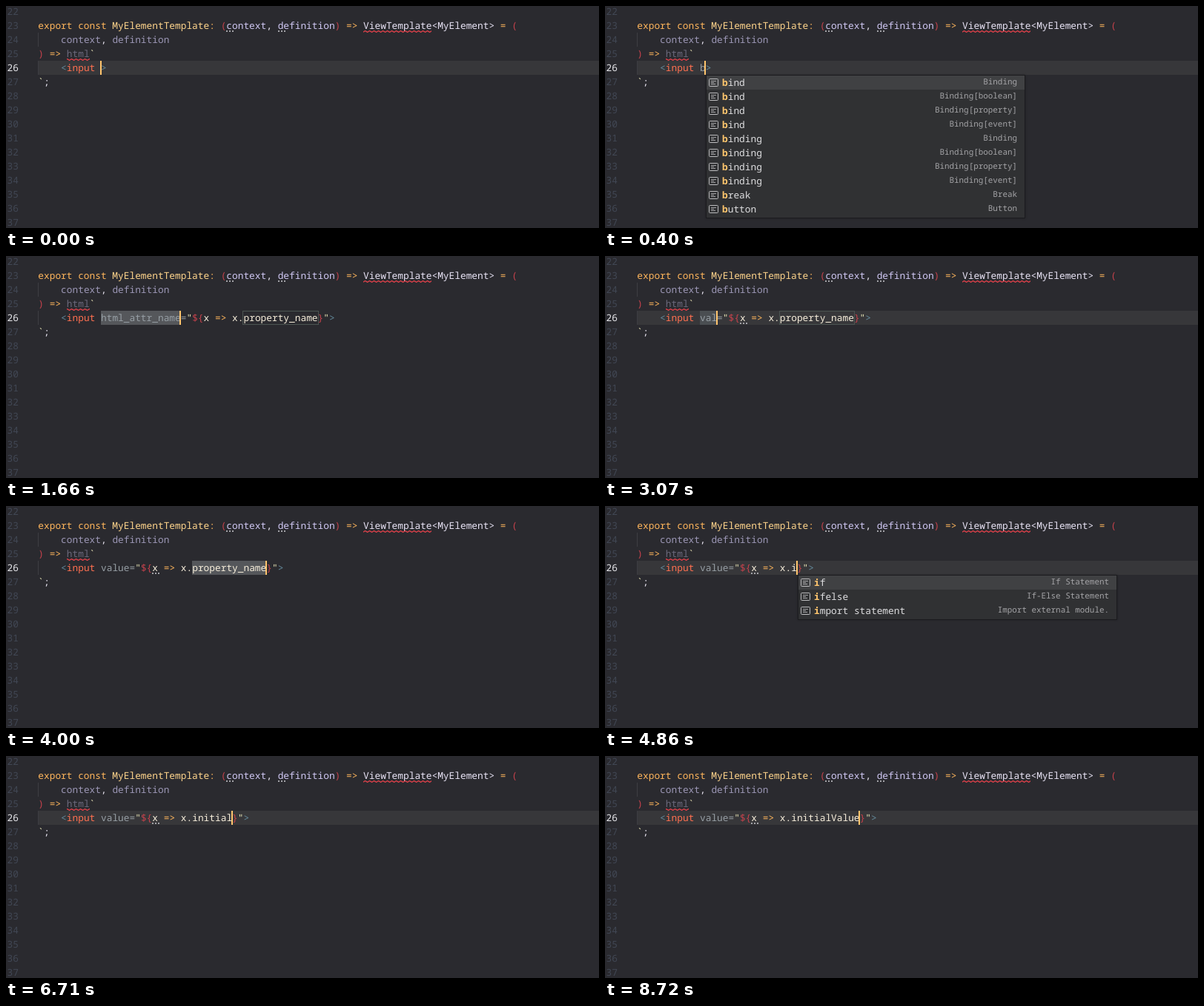
An HTML page for the animation above (8920 ms loop, 800 by 300 pixels).

```html
<!DOCTYPE html>
<html lang="en">
<head>
<meta charset="utf-8">
<title>Template snippet</title>
<style>
html, body { margin: 0; width: 100%; height: 100%; overflow: hidden; background: #2a2a2f; }
#stage {
  position: relative; width: 800px; height: 300px; overflow: hidden;
  font: 500 12.83px/19px "Noto Sans Mono", "DejaVu Sans Mono", monospace;
  font-variant-ligatures: none; text-rendering: geometricPrecision; color: #e8e4f0;
}
pre { position: absolute; margin: 0; font: inherit; white-space: pre; }
#nums { left: 1.5px; top: -2px; color: #414754; }
#nums b { font-weight: inherit; color: #e6e6ea; }
#code { left: 43.3px; top: -2px; }
#line { left: 43.3px; top: 74px; }
#band { position: absolute; left: 43px; right: 0; top: 74px; height: 19px; background: #37373a; }
.guide { position: absolute; left: 43px; width: 1px; height: 19px; background: #3d3d42; }
#wave { position: absolute; left: 0; top: 0; }
#caret { position: absolute; top: 74px; width: 2px; height: 19px; background: #ffc56d; }

.kw { color: #ffb65c; }
.fn { color: #ffd58c; }
.br { color: #c6424c; }
.arg { color: #d0c8f4; }
.dim { color: #9c97b6; }
.off { color: #6b697c; }
.ty { color: #e9e4f6; }
.str { color: #e6e3b4; }
.tag { color: #648b9d; }
.el { color: #ff7051; }
.attr { color: #979fa5; }
.prop { color: #f8efdc; }
.hint { position: relative; }
.hint::after {
  content: ""; position: absolute; left: 0; bottom: 0; width: 10px; height: 2px;
  background: repeating-linear-gradient(90deg, #a3a3a8 0 2px, transparent 2px 4px);
}
.sel, .stop { display: inline-block; height: 19px; vertical-align: top; background: #55575b; }
.stop { background: #4a4e52; }
.last { display: inline-block; height: 17px; line-height: 17px; margin: 1px 0; vertical-align: top; box-shadow: 0 0 0 1px #4c5552; }

#menu {
  position: absolute; top: 93px; width: 431px; box-sizing: border-box;
  border: 1px solid #1b1b1e; padding-bottom: 2px; background: #303133;
  box-shadow: 0 0 3px #0004;
}
.row { position: relative; height: 19px; line-height: 18px; padding-left: 21px; white-space: pre; color: #dedee0; }
.row:first-child { background: #404143; }
.row b { color: #ffc56d; }
.row i { position: absolute; right: 10px; top: 0; font-style: normal; font-size: 10.9px; color: #a4a4a7; }
.row svg { position: absolute; left: 3px; top: 4px; fill: none; stroke: #bcbcbe; }
</style>
</head>
<body>
<div id="stage">
  <div id="band"></div>
  <div class="guide" style="top:36px"></div>
  <div class="guide" style="top:74px"></div>
  <pre id="nums"></pre>
  <pre id="code">

<span class="kw">export const </span><span class="fn">MyElementTemplate</span><span class="kw">:</span> <span class="br">(</span><span class="arg hint">context</span>, <span class="arg hint">definition</span><span class="br">)</span> <span class="kw">=&gt;</span> <span class="ty">ViewTemplate&lt;MyElement&gt;</span> <span class="kw">=</span> <span class="br">(</span>
    <span class="dim">context</span>, <span class="dim">definition</span>
<span class="br">)</span> <span class="kw">=&gt;</span> <span class="off">html</span><span class="str">`</span>

<span class="str">`</span>;</pre>
  <svg id="wave" width="800" height="100">
    <pattern id="zig" width="6" height="3" patternUnits="userSpaceOnUse">
      <path d="M-1 .5L1.5 2.5L4.5 .5L7.5 2.5" fill="none" stroke="#e8414a" stroke-width="1.2"/>
    </pattern>
    <rect x="482" y="33" width="92" height="3" fill="url(#zig)"/>
    <rect x="82" y="69" width="31" height="3" fill="url(#zig)" transform="translate(0 2)"/>
  </svg>
  <pre id="line"></pre>
  <div id="caret"></div>
  <div id="menu"></div>
</div>
<script>
const LOOP = 8920, LEFT = 42.5, CH = 7.698;
const $ = id => document.getElementById(id);
const esc = s => s.replace(/</g, "&lt;").replace(/>/g, "&gt;");
const tok = (s, cls) => `<span class="${cls}">${esc(s)}</span>`;

const kinds = ["Binding", "Binding[boolean]", "Binding[property]", "Binding[event]"];
const binds = ["bind", "binding"].flatMap(name => kinds.map(kind => [name, kind]));
const importRow = ["import statement", "Import external module."];
const menus = {
  b: [...binds, ["break", "Break"], ["button", "Button"]],
  bi: binds,
  bin: binds,
  i: [["if", "If Statement"], ["ifelse", "If-Else Statement"], importRow],
  in: [importRow]
};

// Each step changes only the listed parts of the state.
const steps = [
  [0, { attr: "", prop: null, inProp: false, on: true, attrBox: "", propBox: "", hint: false, menu: "" }],
  [70, { on: false }],
  [400, { attr: "b", menu: "b", on: true }],
  [530, { attr: "bi", menu: "bi" }],
  [600, { attr: "bin", menu: "bin" }],
  [1130, { on: false }],
  [1590, { attr: "html_attr_name", prop: "property_name", attrBox: "sel", propBox: "last", menu: "", on: true }],
  [2060, { hint: true }],
  [2130, { on: false }],
  [2660, { on: true }],
  [2860, { attr: "v", attrBox: "stop" }],
  [2930, { attr: "va" }],
  [3070, { attr: "val" }],
  [3270, { attr: "valu" }],
  [3340, { attr: "value" }],
  [3870, { on: false }],
  [4000, { inProp: true, attrBox: "", propBox: "sel", on: true }],
  [4460, { on: false }],
  [4860, { prop: "i", propBox: "", menu: "i", on: true }],
  [4930, { prop: "in", menu: "in" }],
  [5060, { prop: "ini", menu: "" }],
  [5190, { prop: "init" }],
  [5650, { on: false }],
  [6180, { on: true }],
  [6510, { prop: "initi" }],
  [6580, { prop: "initia" }],
  [6710, { prop: "initial" }],
  [7110, { prop: "initialV" }],
  [7330, { prop: "initialVa" }],
  [7400, { prop: "initialVal" }],
  [7600, { prop: "initialValu" }],
  [7730, { prop: "initialValue" }],
  [8190, { on: false }],
  [8720, { on: true }]
];
const states = [];
steps.forEach(([, change], i) => states.push({ ...states[i - 1], ...change }));

function lineHtml(s) {
  let html = "    " + tok("<", "tag") + tok("input", "el") + " " + tok(s.attr, "attr " + s.attrBox);
  if (s.prop !== null) {
    html += tok("=", "attr") + tok('"', "str") + tok("${", "br") +
      tok("x", s.hint ? "prop hint" : "prop") + " " + tok("=>", "kw") + " " + tok("x.", "prop") +
      tok(s.prop, "prop " + s.propBox) + tok("}", "br") + tok('"', "str");
  }
  return html + tok(">", "tag");
}

function mark(label, typed) {
  let n = 0;
  return [...label].map(c => c === typed[n] ? (n++, `<b>${c}</b>`) : c).join("");
}

function rowHtml([label, kind], typed) {
  const icon = '<svg width="13" height="12"><rect x=".5" y=".5" width="12" height="10" rx="1"/><path d="M3 3.5h7M3 5.5h4M3 7.5h6" opacity=".8"/></svg>';
  return `<div class="row">${icon}${mark(label, typed)}<i>${kind}</i></div>`;
}

function show(s) {
  const col = 11 + s.attr.length + (s.inProp ? 11 + s.prop.length : 0);
  const x = Math.floor(LEFT + col * CH);
  $("line").innerHTML = lineHtml(s);
  $("band").hidden = s.attrBox === "sel" || s.propBox === "sel";
  $("caret").style.left = x + "px";
  $("caret").hidden = !s.on;
  $("menu").hidden = !s.menu;
  $("menu").style.left = x + 2 + "px";
  $("menu").innerHTML = s.menu ? menus[s.menu].map(r => rowHtml(r, s.menu)).join("") : "";
}

$("nums").innerHTML = Array.from({ length: 16 }, (_, i) => i === 4 ? "<b>26</b>" : 22 + i).join("\n");

let shown = -1;
function frame() {
  const t = performance.now() % LOOP;
  let i = steps.length - 1;
  while (steps[i][0] > t) i--;
  if (i !== shown) show(states[shown = i]);
  requestAnimationFrame(frame);
}
frame();
</script>
</body>
</html>
```
